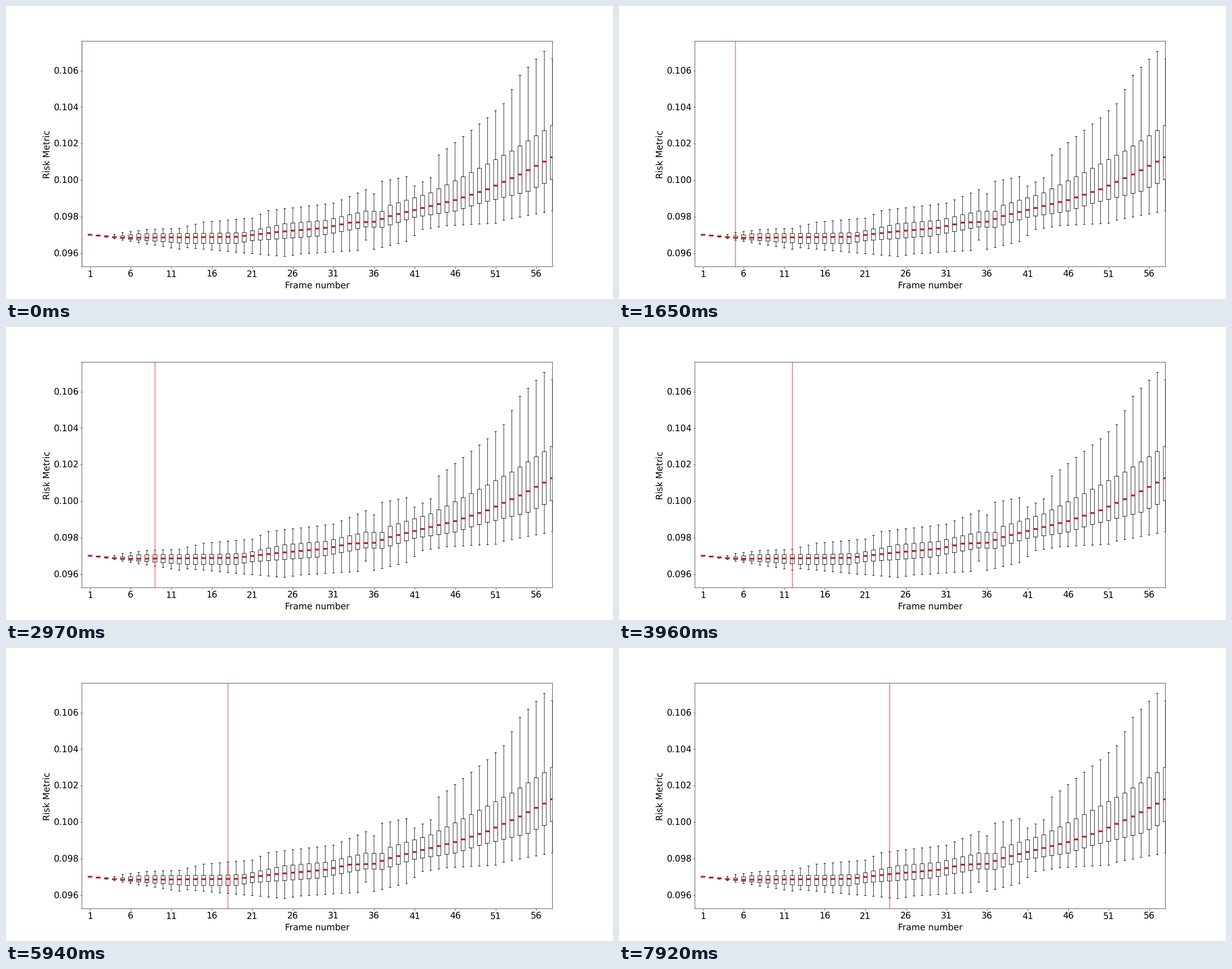
A matplotlib script that plays this animation: 1077x520 px, repeating every 8 s.

```python
import numpy as np
import matplotlib.pyplot as plt
from matplotlib.animation import FuncAnimation

W, H, DPI = 1077, 520, 64
LOOP, TICK, STEP = 8000, 20, 330  # ms
PT = 56.1 / DPI                   # scale of all point sizes
N = 58

plt.rcParams["font.family"] = "DejaVu Sans"
plt.rcParams["text.hinting"] = "none"


def risk(y):
    """Risk value at a height given in stage pixels."""
    return 0.096 + (438.5 - np.asarray(y, float)) / 32400


def through(*knots):
    """One height per box, linear between a few (box, height) knots."""
    x, y = zip(*knots)
    return np.interp(np.arange(1, N + 1), x, y)


median = through(
    (1, 406), (5, 411.5), (19, 409.7), (24, 401.3), (30, 393.7), (33, 384.5),
    (36, 383), (38, 372.8), (43, 355), (46, 344.5), (50, 325.3), (54, 299),
    (58, 268.5))
upper = through(
    (1, 406), (4, 410), (7, 404.2), (16, 403.6), (20, 402), (25, 386.3),
    (30, 380.5), (35, 364), (37, 364.5), (38, 353.5), (43, 331.7),
    (48, 295.7), (53, 257.3), (58, 212))
lower = through(
    (1, 406), (6, 414), (13, 421.3), (19, 421.3), (21, 416.3), (29, 408.5),
    (35, 392), (37, 393), (41, 375), (46, 364), (49, 350.3), (55, 329),
    (58, 308))
high = through(
    (1, 406), (3, 409.5), (5, 402), (8, 396.7), (12, 394.5), (15, 383.5),
    (21, 376.5), (23, 363), (31, 350), (35, 326), (36, 333.5), (37, 311),
    (40, 303), (41, 319.5), (43, 305), (44, 264.5), (50, 198.3), (52, 173.5),
    (54, 123), (57, 80.5), (58, 93.5))
low = through(
    (1, 406), (3, 410.2), (5, 415.5), (12, 431.5), (13, 429), (19, 437),
    (25, 444.5), (27, 440), (34, 434), (35, 415.5), (36, 432), (40, 418),
    (42, 396.5), (45, 390), (51, 385.5), (52, 380), (58, 363.5))


def joined(strokes):
    """Chain strokes into one pair of arrays with gaps between them."""
    xs, ys = [], []
    for x, y in strokes:
        xs += [*x, np.nan]
        ys += [*y, np.nan]
    return xs, risk(ys)


def box_strokes():
    box, cap = 0.25, 0.125
    for n, hi, up, dn, lo in zip(range(1, N + 1), high, upper, lower, low):
        yield (n - box, n + box, n + box, n - box, n - box), (dn, dn, up, up, dn)
        for edge, end in ((up, hi), (dn, lo)):
            yield (n, n), (edge, end)
            yield (n - cap, n + cap), (end, end)


def median_strokes():
    for n, y in enumerate(median, 1):
        yield (n - 0.27, n + 0.27), (y, y)


fig = plt.figure(figsize=(W / DPI, H / DPI), dpi=DPI, facecolor="white")
ax = fig.add_axes([0.1252, 0.11, 0.775, 0.77])
ax.set_xlim(0, N)
ax.set_ylim(risk(462.8), risk(62.4))

ax.plot(*joined(box_strokes()), color="black", lw=PT, snap=False, zorder=2)
ax.plot(*joined(median_strokes()), color="firebrick", lw=4 * PT,
        solid_capstyle="butt", snap=False, zorder=3)
cursor = ax.axvline(0, color="red", lw=PT, snap=False, zorder=5)

ticks = np.arange(0.096, 0.1065, 0.002)
ax.set_xticks(range(1, N, 5))
ax.set_yticks(ticks, [f"{t:.3f}" for t in ticks])
ax.tick_params(labelsize=20 * PT, length=3.5 * PT, width=0.8 * PT, pad=3.5 * PT)
ax.tick_params(axis="x", pad=4.5 * PT)
ax.set_xlabel("Frame number", fontsize=20 * PT, labelpad=4.8 * PT)
ax.set_ylabel("Risk Metric", fontsize=20 * PT, labelpad=4 * PT)
for spine in ax.spines.values():
    spine.set(linewidth=0.8 * PT, snap=False)


def update(i):
    # A jump inside a tick shows from that tick's start.
    n = (i * TICK + TICK // 2) // STEP
    cursor.set_xdata([n, n])
    return [cursor]


anim = FuncAnimation(fig, update, frames=LOOP // TICK, interval=TICK,
                     repeat=True, repeat_delay=0, blit=False)
plt.show()
```
